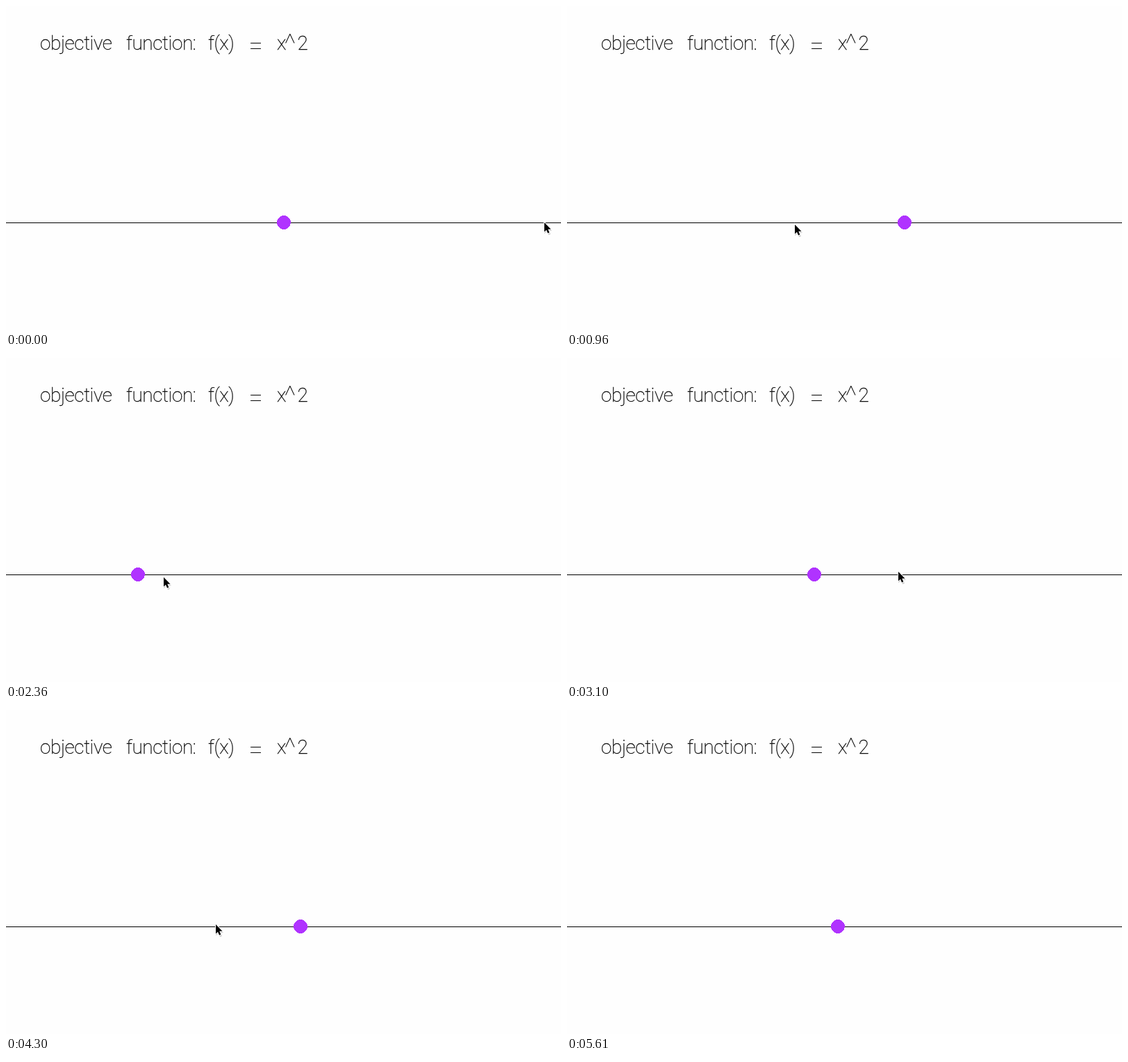
Write an HTML page that moves like this. It is 799x467 px and loops after 5.71 s.

```html
<!DOCTYPE html>
<html lang="en">
<head>
<meta charset="utf-8">
<title>Gradient descent</title>
<style>
  html, body { margin: 0; width: 100%; height: 100%; overflow: hidden; background: #fefefe; }
  svg { display: block; }
  text { font: 100 28px Roboto, Inter, sans-serif; letter-spacing: -.4px; stroke: #000; stroke-width: .3px; }
  .sign { font: 100 44px Inter, sans-serif; stroke: none; }
</style>
</head>
<body>
<svg width="799" height="467" viewBox="0 0 799 467">
  <text x="49" y="63">objective</text>
  <text x="173" y="63">function:</text>
  <text x="291" y="63">f(x)</text>
  <text x="345.5" y="70" class="sign">=</text>
  <text x="390" y="63">x</text>
  <text x="400" y="71" class="sign">^</text>
  <text x="419.5" y="63">2</text>
  <rect y="312" width="799" height="1"/>
  <circle id="ball" cy="312" r="10" fill="#b033ff" shape-rendering="crispEdges"/>
  <g id="cursor">
    <path d="M0 1V16L4 13L6 18L9 17L7 12H11Z" opacity=".2"/>
    <path d="M0 0V13.5L3 10.7L5 15.4L7.3 14.4L5.3 9.8H9.5Z" stroke="#fff" stroke-width="2" paint-order="stroke"/>
  </g>
</svg>
<script>
const LOOP = 5710, CENTER = 400, RATE = 0.0021, LAG = 24;
const ball = document.getElementById('ball');
const cursor = document.getElementById('cursor');

// Key points of the pointer: time, x, y. It rests around each click.
const path = [
  [0, 775, 312], [60, 775, 312], [480, 571, 312], [620, 571, 312], [960, 328, 315],
  [1760, 36, 308], [2090, 36, 308], [2360, 227, 316], [3100, 477, 308],
  [3500, 509, 310], [3590, 509, 310], [4200, 302, 309], [4750, 304, 310],
  [5240, 712, 480], [LOOP, 712, 480]
];
const clicks = [610, 2075, 3556, 4504];

const slope = (i, k) => path[i + 1] && path[i]
  ? (path[i + 1][k] - path[i][k]) / (path[i + 1][0] - path[i][0]) : 0;

// Harmonic mean keeps the curve from overshooting its points.
function tangent(i, k) {
  const a = slope(i - 1, k), b = slope(i, k);
  return a * b > 0 ? 2 * a * b / (a + b) : 0;
}

function pointer(t, k) {
  const i = path.findIndex(p => p[0] > t) - 1;
  const p = path[i], q = path[i + 1], span = q[0] - p[0], u = (t - p[0]) / span, v = 1 - u;
  return p[k] * v * v * (1 + 2 * u) + q[k] * u * u * (3 - 2 * u)
    + span * u * v * (tangent(i, k) * v - tangent(i + 1, k) * u);
}

// A click drops the ball at the pointer, from where it descends to the minimum.
function ballX(t) {
  const click = clicks.filter(c => c <= t).pop();
  if (!click) return CENTER;
  const age = Math.max(0, t - click - LAG);
  return CENTER + (pointer(click, 1) - CENTER) * Math.exp(-RATE * age);
}

function draw(t) {
  const x = Math.round(pointer(t, 1)), y = Math.round(pointer(t, 2));
  ball.setAttribute('cx', Math.round(ballX(t)));
  cursor.setAttribute('transform', `translate(${x} ${y})`);
}

const start = performance.now();
function tick() {
  draw((performance.now() - start) % LOOP);
  requestAnimationFrame(tick);
}
tick();
</script>
</body>
</html>
```
